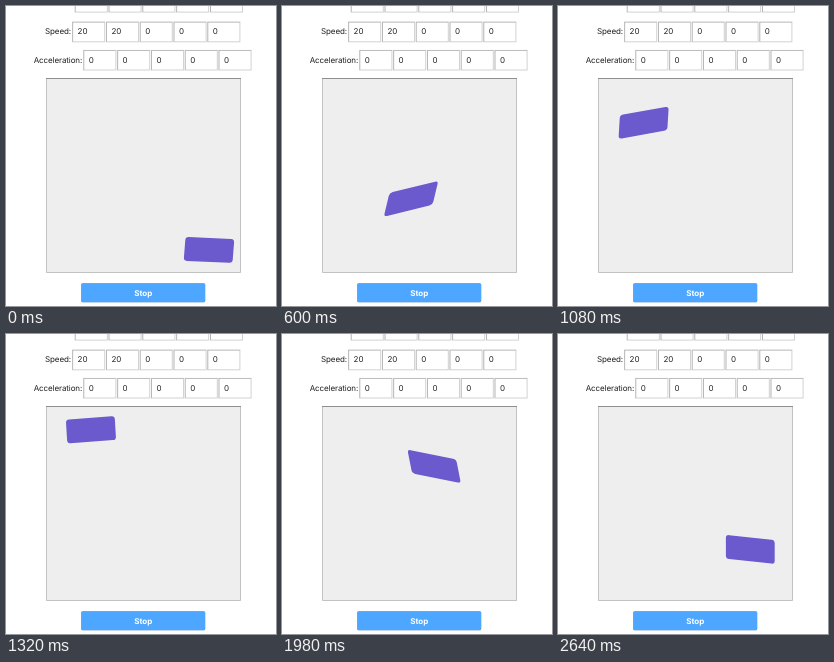
Recreate the animation shown at these times as an HTML page. Size 270 by 300 pixels, loop 2700 ms.

```html
<!DOCTYPE html>
<html lang="en">
<head>
<meta charset="utf-8">
<title>Skewing box</title>
<style>
  html, body { margin: 0; width: 100%; height: 100%; overflow: hidden; background: #fff; }
  svg { display: block; width: 270px; height: 300px; }
  text { font: 8px Inter, "Liberation Sans", sans-serif; fill: #222; text-rendering: geometricPrecision; }
  .label { text-anchor: end; letter-spacing: -.1px; }
  .stop { font-weight: 700; fill: #fff; text-anchor: middle; }
  .dark { fill: #b8b8b8; }
  .light { fill: #d2d2d2; }
  .field { fill: #fff; }
  .button { fill: #4da6ff; filter: drop-shadow(0 .9px .7px #0006); }
</style>
</head>
<body>
<svg viewBox="0 0 270 300">
  <g id="rows"></g>
  <rect x="40" y="72" width="195" height="195" fill="#eee"/>
  <path d="M40.5 72V266.5H234.5V72" fill="none" stroke="#c2c2c2"/>
  <path d="M40 72.5H235" stroke="#8e8e8e"/>
  <rect id="box" x="-24.4" y="-11.9" width="48.8" height="23.8" rx="3.2" fill="#6a5acd"/>
  <rect class="button" x="75.2" y="277.2" width="124" height="19.1" rx="1.5"/>
  <text class="stop" x="137.2" y="290">Stop</text>
</svg>
<script>
const LOOP = 2700, STEP = 60;
const rows = document.getElementById('rows');
const box = document.getElementById('box');

// One labelled row of five inset number fields
function row(label, left, top, values) {
  const w = 33, h = 20.6, base = top + 12.7;
  let out = `<text class="label" x="${left - 1.2}" y="${base}">${label}</text>`;
  values.forEach((value, i) => {
    const x = left + i * 33.8;
    out += `<rect class="light" x="${x}" y="${top}" width="${w}" height="${h}"/>
      <path class="dark" d="M${x} ${top}h${w}l-1 1h${2 - w}v${h - 2}l-1 1z"/>
      <rect class="field" x="${x + 1}" y="${top + 1}" width="${w - 2}" height="${h - 2}"/>
      <text x="${x + 5.4}" y="${base}">${value}</text>`;
  });
  rows.insertAdjacentHTML('beforeend', out);
}
row('', 68.8, -14, [100, 100, 0, 0, 0]);
row('Speed:', 66.2, 15.7, [20, 20, 0, 0, 0]);
row('Acceleration:', 77.4, 43.9, [0, 0, 0, 0, 0]);

// Turning points as [seconds, position]; lead pushes each swing ahead of a plain cosine
const swingX = { lead: 0.05, turns: [[-0.1, 205.3], [1.22, 83.2], [2.64, 192.3]] };
const swingY = { lead: 0.02, turns: [[0.07, 245], [1.47, 92], [2.92, 226]] };

function swing({ lead, turns }, t) {
  const i = t < turns[1][0] ? 0 : 1;
  const [t0, p0] = turns[i], [t1, p1] = turns[i + 1];
  const u = (t - t0) / (t1 - t0);
  const phase = Math.PI * (u + lead * Math.sin(Math.PI * u));
  return p0 + (p1 - p0) * (1 - Math.cos(phase)) / 2;
}

function speed(path, t) {
  const d = 0.005;
  return (swing(path, t + d) - swing(path, t - d)) / (2 * d);
}

function draw(now) {
  const t = Math.floor(now % LOOP / STEP) * STEP / 1000;
  // The box leans with its velocity
  const leanX = speed(swingX, t) / 580, leanY = speed(swingY, t) / 680;
  box.setAttribute('transform',
    `matrix(1 ${leanY} ${leanX} 1 ${swing(swingX, t)} ${swing(swingY, t)})`);
}

const start = performance.now();
function tick() {
  draw(performance.now() - start);
  requestAnimationFrame(tick);
}
tick();
</script>
</body>
</html>
```
